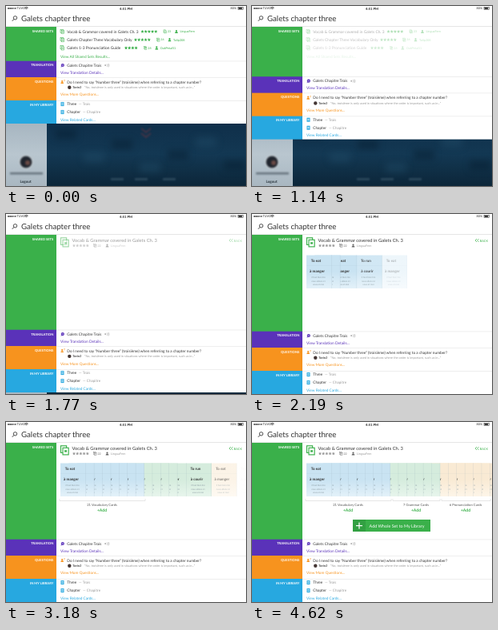
An HTML page with a canvas that plays this animation: 300x225 px, repeating every 4950 ms.

```html
<!DOCTYPE html>
<html lang="en">
<head>
<meta charset="utf-8">
<title>Study search</title>
<style>
html, body { margin: 0; height: 100%; overflow: hidden; background: #fff; }
canvas { display: block; }
</style>
</head>
<body>
<canvas id="stage" width="300" height="225"></canvas>
<script>
const LOOP = 4950;
const GREEN = '#3ab04a', PURPLE = '#5a32b9', ORANGE = '#f7931e', BLUE = '#27a8e0';
const INK = '#333', GRAY = '#999';
const ctx = document.getElementById('stage').getContext('2d');
ctx.textRendering = 'geometricPrecision';

const clamp = v => Math.max(0, Math.min(1, v));
const ramp = (t, from, to) => clamp((t - from) / (to - from));
const easeInOut = p => p < .5 ? 2 * p * p : 1 - 2 * (1 - p) ** 2;

function track(t, points) {
  const i = points.findIndex(p => t < p[0]);
  if (i < 0) return points[points.length - 1][1];
  if (i === 0) return points[0][1];
  const [t0, a] = points[i - 1], [t1, b] = points[i];
  return a + (b - a) * (t - t0) / (t1 - t0);
}

function rect(x, y, w, h, color) {
  ctx.fillStyle = color;
  ctx.fillRect(x, y, w, h);
}

// y is the middle of the capital letters
function text(s, x, y, size, color = INK, align = 'left', style = '') {
  ctx.font = `${style} ${size}px Lato, sans-serif`;
  ctx.textAlign = align;
  ctx.fillStyle = color;
  ctx.fillText(s, x, y + size * .36);
}

function disc(x, y, r, color) {
  ctx.fillStyle = color;
  ctx.beginPath();
  ctx.arc(x, y, r, 0, 7);
  ctx.fill();
}

function line(points, color, width = .6) {
  ctx.strokeStyle = color;
  ctx.lineWidth = width;
  ctx.beginPath();
  points.forEach(([x, y]) => ctx.lineTo(x, y));
  ctx.stroke();
}

function faded(alpha, draw) {
  if (alpha <= 0) return;
  ctx.save();
  ctx.globalAlpha = alpha;
  draw();
  ctx.restore();
}

function gradient(y0, y1, ...colors) {
  const g = ctx.createLinearGradient(0, y0, 0, y1);
  colors.forEach((c, i) => g.addColorStop(i / (colors.length - 1), c));
  return g;
}

function copies(x, y, s, color) {
  ctx.lineWidth = s * .1;
  ctx.strokeStyle = color;
  for (const d of [0, .22]) {
    rect(x + d * s, y + (d - .5) * s, s * .62, s * .75, '#fff');
    ctx.strokeRect(x + d * s, y + (d - .5) * s, s * .62, s * .75);
  }
  rect(x + s * .4, y - s * .02, s * .26, s * .2, color);
}

function person(x, y, color) {
  disc(x, y - 1, 1.1, color);
  ctx.beginPath();
  ctx.arc(x, y + 2, 1.9, Math.PI, 0);
  ctx.fill();
}

function stars(x, y, n, color) {
  ctx.fillStyle = color;
  for (let i = 0; i < n; i++) {
    ctx.beginPath();
    for (let j = 0; j < 10; j++) {
      const a = j * Math.PI / 5, r = j % 2 ? 1 : 2.2;
      ctx.lineTo(x + 2 + i * 4.2 + r * Math.sin(a), y - r * Math.cos(a));
    }
    ctx.fill();
  }
}

function backdrop() {
  rect(51, 140, 249, 85, gradient(146, 225, '#0f2f4a', '#133853', '#0c2639'));
  ctx.save();
  ctx.filter = 'blur(4px)';
  for (let i = 0; i < 7; i++)
    rect(62 + i * 35, 154 + i * 29 % 45, 26, 12, i % 2 ? '#25506c66' : '#08203488');
  ctx.filter = 'blur(1px)';
  for (const y of [153, 159]) line([[169, y], [175, y + 5], [181, y]], '#6a343f99', 2);
  for (const x of [139, 169, 204]) rect(x - 8, 215.5, 16, 2, '#8ca7ba55');
  ctx.restore();

  rect(0, 140, 51, 85, gradient(146, 225, '#a6b5c0', '#b9c6cf', '#a9b7c1'));
  ctx.save();
  ctx.filter = 'blur(1px)';
  disc(25, 195, 9, '#ccd5db');
  disc(25, 195, 7.5, '#20252e');
  disc(27, 196, 3, '#6b4b46');
  rect(5, 208, 41, 2.5, '#65727c');
  ctx.filter = 'blur(.4px)';
  text('Logout', 24.5, 219, 4.6, '#29343c', 'center', 'bold');
  ctx.restore();
}

function topBar() {
  rect(0, 0, 300, 26, '#fff');
  for (let i = 0; i < 5; i++) {
    disc(3 + i * 2.2, 2.9, .9, '#222');
    if (i > 2) disc(3 + i * 2.2, 2.9, .5, '#fff');
  }
  text('TUVO', 13.5, 3, 3.8, '#222');
  for (const r of [1, 2.2, 3.3]) {
    ctx.strokeStyle = '#222';
    ctx.lineWidth = .7;
    ctx.beginPath();
    ctx.arc(25.5, 4.7, r, -2.3, -.84);
    ctx.stroke();
  }
  text('4:51 PM', 150, 3, 4.2, '#222', 'center', 'bold');
  text('80%', 288, 3, 3.8, '#222', 'right');
  ctx.lineWidth = .5;
  ctx.strokeRect(290, 1.4, 6.5, 3);
  rect(290.6, 2, 4.6, 1.8, '#222');
  ctx.lineWidth = .8;
  ctx.beginPath();
  ctx.arc(11.5, 14.8, 2.2, 0, 7);
  ctx.stroke();
  line([[10, 16.4], [7.8, 18.8]], '#222', .9);
  text('Galets chapter three', 19, 15.9, 9.7, INK);
  rect(0, 25.5, 300, .5, '#ccc');
}

function section(y, h, color, label) {
  rect(0, y, 63, h, color);
  rect(63, y, 237, .5, '#ddd');
  text(label, 59.3, y + 5.3, 4.1, '#fff', 'right', 'bold');
}

const SETS = [
  ['Vocab & Grammar covered in Galets Ch. 3', 168.5, 5, '23', 'LinguaFern'],
  ['Galets Chapter Three Vocabulary Only', 160, 5, '16', 'Tulip208'],
  ['Galets 1-3 Pronunciation Guide', 148, 4, '28', 'OakPetal51']
];

function setList(t) {
  const alpha = i => 1 - ramp(t, 900 - 35 * i, 1300 - 35 * i);
  SETS.forEach(([title, x, count, cards, user], i) => faded(alpha(i), () => {
    const y = 32 + i * 10.2, end = x + count * 4.2;
    copies(68, y, 5.5, GREEN);
    text(title, 76.3, y, 4.87);
    stars(x, y, count, GREEN);
    copies(end + 7.5, y, 4.2, GREEN);
    text(cards, end + 12.5, y, 3.6, GREEN);
    person(end + 23.5, y, GREEN);
    text(user, end + 28, y, 3.8, GREEN);
  }));
  faded(alpha(3), () => text('View All Shared Sets Results...', 68, 63.6, 4.75, GREEN));
}

function lowerSections(s) {
  ctx.save();
  ctx.translate(0, s);
  section(68.7, 20.6, PURPLE, 'TRANSLATION');
  disc(70.8, 74, 2.1, PURPLE);
  line([[69.7, 74], [71.9, 74]], '#fff');
  line([[69.5, 75], [69, 76.5]], PURPLE, .8);
  text('Galets Chapitre Trois', 76.3, 74, 4.75);
  rect(123.5, 73.2, 1.3, 1.8, GRAY);
  line([[126.3, 72.6], [127, 74.2], [126.3, 75.8]], GRAY);
  line([[128, 72], [128.8, 74.2], [128, 76.4]], GRAY);
  text('View Translation Details...', 68, 83, 4.8, PURPLE);

  section(89, 29.3, ORANGE, 'QUESTIONS');
  person(70.2, 95, ORANGE);
  text('?', 72, 93.7, 4, ORANGE, 'left', 'bold');
  text('Do I need to say “Number three” (troisième) when referring to a chapter number?', 76.3, 94.8, 4.75);
  disc(79.3, 101.8, 2.2, '#443634');
  text('Tovin3', 83.3, 101.7, 3.9, '#444', 'left', 'italic bold');
  text('“No, troisième is only used in situations where the order is important, such as in...”', 98, 101.7, 3.88, GRAY);
  text('View More Questions...', 68, 110.8, 4.7, ORANGE);

  section(118, 29, BLUE, 'IN MY LIBRARY');
  [['Three', 'Trois', 91], ['Chapter', 'Chapitre', 96]].forEach(([word, meaning, x], i) => {
    const y = 122.6 + i * 10;
    rect(68.5, y - 2.5, 4, 5, BLUE);
    rect(69.4, y - 1.3, 2.2, .8, '#fff');
    rect(69.4, y + .3, 2.2, .8, '#fff');
    text(word, 76.3, y, 4.75);
    text('— ' + meaning, x, y, 4.6, GRAY);
  });
  text('View Related Cards...', 68, 142, 4.75, BLUE);
  ctx.restore();
}

function setHeader() {
  copies(68.5, 35.5, 11.5, GREEN);
  text(SETS[0][0], 82.5, 32.8, 5.8);
  stars(83, 39.5, 5, GRAY);
  copies(109.5, 39.5, 4.2, '#666');
  text('22', 114.5, 39.5, 3.6, '#666');
  person(126.5, 39.5, '#666');
  text('LinguaFern', 131, 39.5, 3.8, GRAY);
  for (const x of [279, 281.5]) line([[x + 2, 31], [x, 33], [x + 2, 35]], GREEN, .7);
  text('BACK', 284.8, 33.2, 3.9, GREEN);
}

const TINTS = [['#e3f1f9', '#c9e3f2'], ['#e7f5ec', '#d5ecdd'], ['#fdf5e8', '#f9ead4']];
const PITCH = 10.4, CARD = 32;

function card(x, k) {
  const [light, dark] = TINTS[k < 8 ? 0 : k < 14 ? 1 : 2];
  const [word, verb] = k % 2 ? ['To run', 'à courir'] : ['To eat', 'à manger'];
  rect(x, 51.5, CARD, 41.5, gradient(51, 93, dark, dark, light));
  rect(x + CARD - .5, 51.5, .5, 41.5, '#8fa9b644');
  rect(x, 64, CARD, .4, '#8fa9b633');
  text(word, x + 12, 58.2, 4.6, INK, 'center', 'bold');
  text(verb, x + 13.5, 71, 4.6, INK, 'center', 'bold');
  ['il faut bien lire', 'nous allons ici', 'vous et moi'].forEach((s, i) =>
    text(s, x + 15, 79 + i * 4.5, 2.8, '#8b9ba3', 'center'));
}

// Cards slide in from the right; the leftmost lies on top.
function cards(t) {
  const landed = track(t, [[1770, -3.3], [2190, 1.5], [3180, 11.95], [3690, 18.55], [3960, 20]]);
  for (let k = 20; k >= 0; k--) {
    const offset = Math.max(0, 21 * (k - landed));
    faded(clamp((65 - offset) / 40), () => card(68 + PITCH * k + offset, k));
  }
}

const GROUPS = [
  ['21 Vocabulary Cards', 67, 174, 2850],
  ['7 Grammar Cards', 176, 235, 3300],
  ['6 Pronunciation Cards', 237, 298, 3620]
];

function captions(t) {
  for (const [label, left, right, start] of GROUPS) faded(ramp(t, start, start + 260), () => {
    const mid = (left + right) / 2 - .5;
    line([[left, 96], [left, 98.5], [right, 98.5], [right, 96]], '#ccc', .5);
    text(label, mid, 103.4, 4.2, '#555', 'center');
    text('+Add', mid, 110.3, 5.1, GREEN, 'center', 'bold');
  });
}

function addButton() {
  rect(126, 122, 97, 15, GREEN);
  rect(126, 122, 16, 15, '#32a042');
  rect(130, 129, 8, 1.2, '#fff');
  rect(133.4, 125.6, 1.2, 8, '#fff');
  text('Add Whole Set to My Library', 181, 129.6, 5.4, '#fff', 'center');
}

function render(t) {
  const shift = 78 * easeInOut(ramp(t, 721, 1904));
  backdrop();
  rect(63, 26, 237, 121 + shift, '#fff');
  rect(0, 26, 63, 43 + shift, GREEN);
  text('SHARED SETS', 59.3, 31.6, 4.1, '#fff', 'right', 'bold');
  setList(t);
  faded(ramp(t, 1600, 1950), setHeader);
  cards(t);
  captions(t);
  faded(ramp(t, 4140, 4620), addButton);
  lowerSections(shift);
  topBar();
}

const began = performance.now();
function tick() {
  render((performance.now() - began) % LOOP);
  requestAnimationFrame(tick);
}
tick();
</script>
</body>
</html>
```
